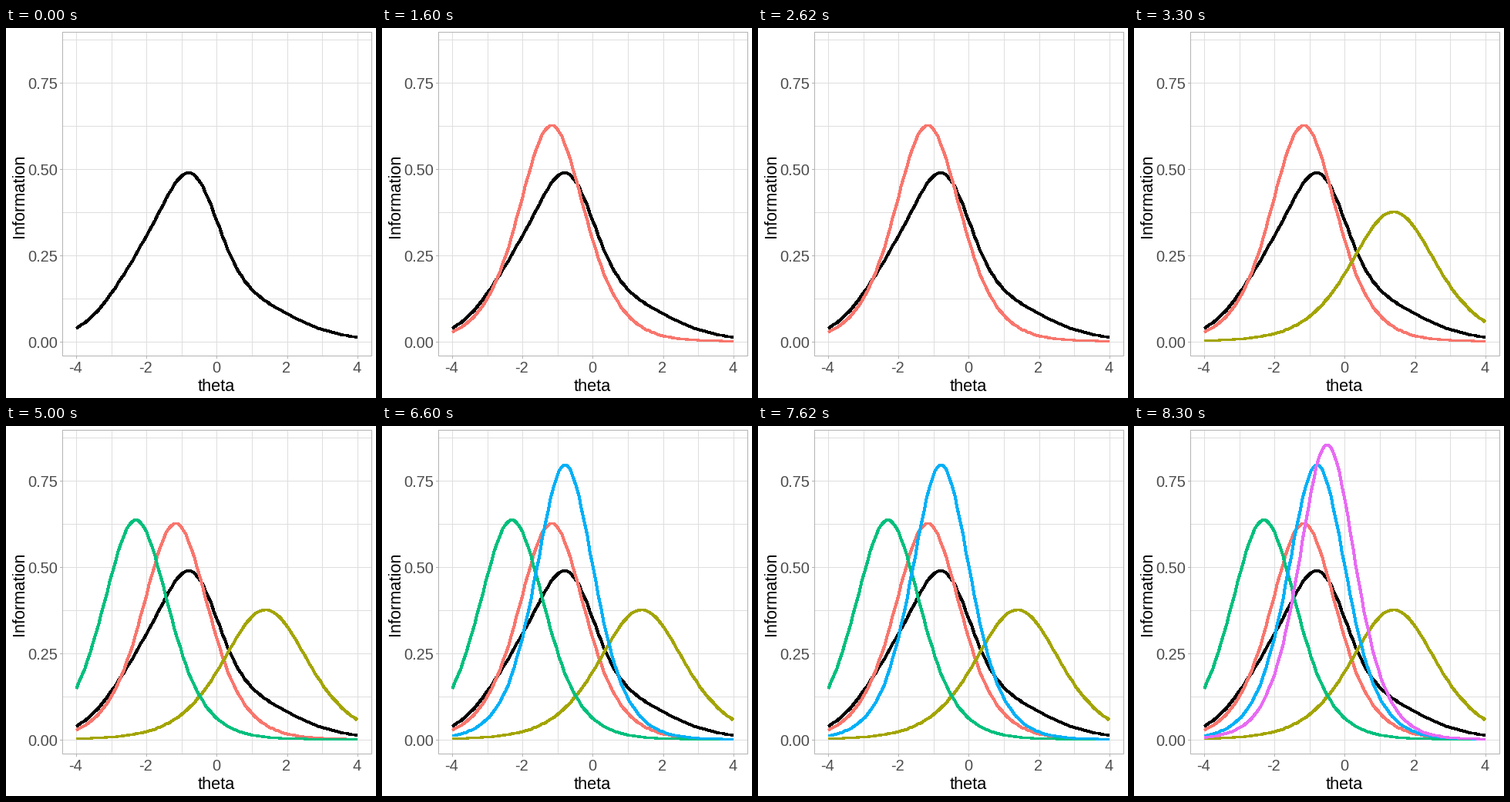
Animation of 480 by 480 pixels, one loop 10000 ms. Source, as a matplotlib script:

```python
import numpy as np
import matplotlib.pyplot as plt
from matplotlib.animation import FuncAnimation

SIZE, DPI = 480, 100
PX = 72 / DPI                      # points per pixel
LEFT, RIGHT, TOP, BOTTOM = 73.5, 474.5, 5.5, 425.5
GRID, BORDER, LABEL = "#DEDEDE", "#B3B3B3", "#4D4D4D"

# (discrimination, difficulty, colour, first tick shown)
ITEMS = [
    (1.583, -1.17, "#F8766D", 16),
    (1.227, 1.39, "#A3A500", 33),
    (1.597, -2.30, "#00BF7D", 50),
    (1.785, -0.79, "#00B0F6", 66),
    (1.849, -0.50, "#E76BF3", 83),
]

plt.rcParams["font.family"] = "Liberation Sans"
fig = plt.figure(figsize=(SIZE / DPI, SIZE / DPI), dpi=DPI, facecolor="white")
ax = fig.add_axes([0, 0, 1, 1])
ax.set_xlim(0, SIZE)
ax.set_ylim(SIZE, 0)
ax.axis("off")


def px(theta):
    return 273.4 + 45.57 * theta


def py(info):
    return 406.55 - 447 * info


def information(theta, a, b):
    p = 1 / (1 + np.exp(-a * (theta - b)))
    return a * a * p * (1 - p)


def rule(xs, ys, color):
    ax.plot(xs, ys, color=color, lw=PX, solid_capstyle="projecting",
            solid_joinstyle="miter", snap=False)


def curve(info, color):
    # whole-pixel points and hard edges give the stepped stroke
    return ax.plot(np.floor(px(theta)) + 0.5, np.floor(py(info)) + 0.5,
                   color=color, lw=3 * PX, antialiased=False, snap=False,
                   solid_capstyle="butt", solid_joinstyle="round")[0]


def text(x, y, s, size, color, **kw):
    ax.text(x, y, s, fontsize=size * PX, color=color, va="baseline", **kw)


for t in range(-4, 5):
    x = np.round(px(t)) + 0.5
    rule([x, x], [TOP, BOTTOM], GRID)
    if t % 2 == 0:
        rule([x, x], [BOTTOM, BOTTOM + 3], BORDER)
        text(px(t) - 1, 447, str(t), 20, LABEL, ha="center")

for k in range(8):
    y = np.round(py(k / 8)) + 0.5
    rule([LEFT, RIGHT], [y, y], GRID)
    if k % 2 == 0:
        rule([LEFT - 3, LEFT], [y, y], BORDER)
        text(67.5, y + 7.5, f"{k / 8:.2f}", 20, LABEL, ha="right")

rule([LEFT, RIGHT, RIGHT, LEFT, LEFT], [TOP, TOP, BOTTOM, BOTTOM, TOP], BORDER)
text(272.5, 471, "theta", 21.8, "black", ha="center")
text(23, 271.5, "Information", 21.8, "black", ha="left",
     rotation=90, rotation_mode="anchor")

theta = np.linspace(-4, 4, 101)
infos = [information(theta, a, b) for a, b, _, _ in ITEMS]
curve(np.mean(infos, axis=0), "black")
lines = [curve(info, item[2]) for info, item in zip(infos, ITEMS)]


def update(tick):
    for line, item in zip(lines, ITEMS):
        line.set_visible(tick >= item[3])
    return lines


anim = FuncAnimation(fig, update, frames=100, interval=100,
                     init_func=lambda: update(0), repeat=True, repeat_delay=0)
plt.show()
```
